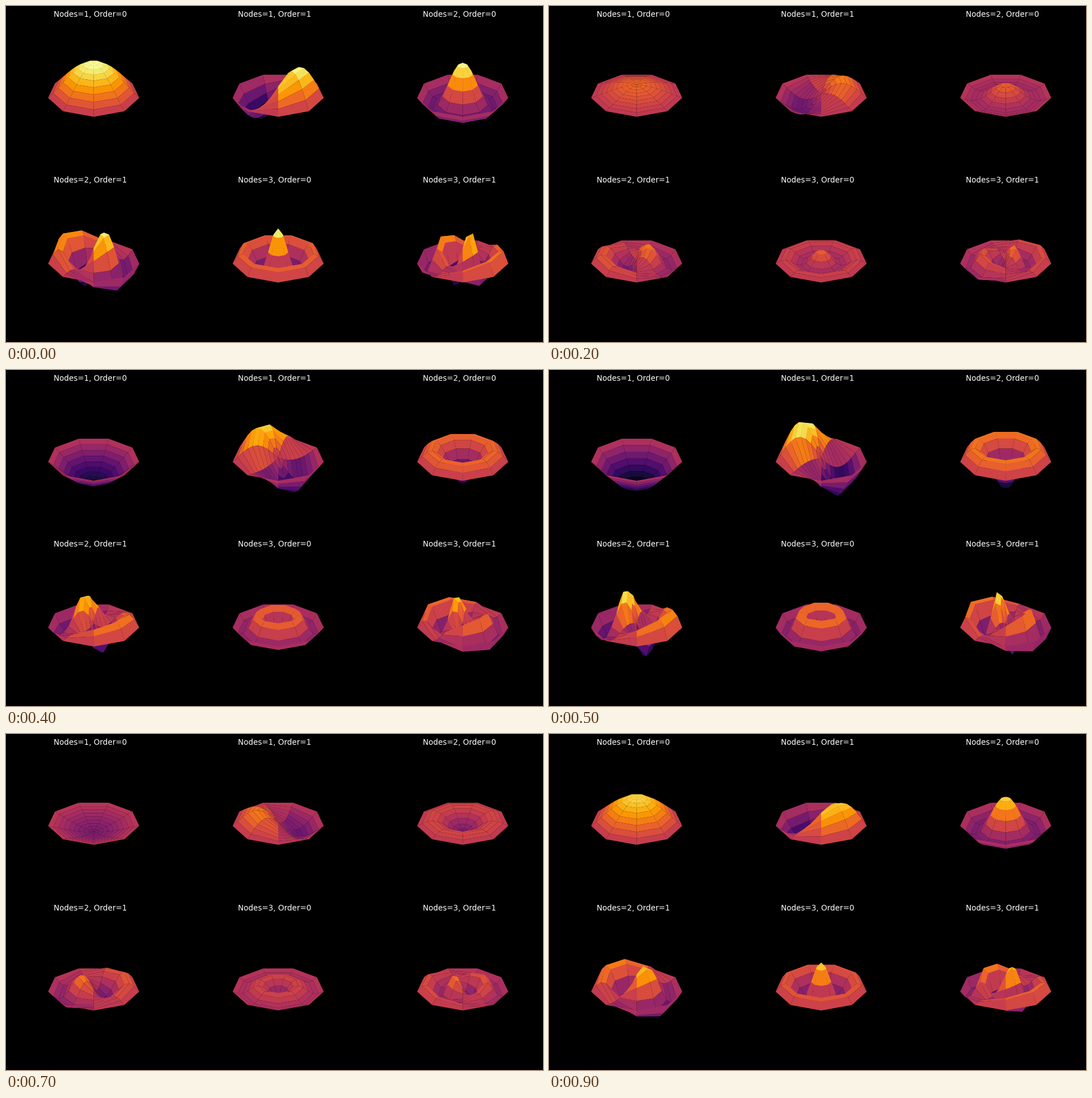
A matplotlib script that plays this animation: 947 px wide and 592 px high, repeating every 1 s.

```python
import numpy as np
import matplotlib.pyplot as plt
from matplotlib.animation import FuncAnimation
from matplotlib.collections import PolyCollection

WIDTH, HEIGHT, DPI = 947, 592, 100
FRAMES, INTERVAL = 10, 100
COLUMN_STEP, ROW_STEP = 325.4, 292

# Camera: disc radius and height in pixels, foreshortening and perspective
RADIUS, TILT, LIFT = 80.9, 38.0, 54.0
DEPTH_FLOOR, DEPTH_HEIGHT = 0.0495, 0.02
CENTER_X, CENTER_Y = 154.6, 155.2

# Order-1 modes swing in a narrow ellipse about this axis
AXIS, MINOR = 1.0, 1 / 3

ZEROS = {(1, 0): 2.4048, (1, 1): 3.8317, (2, 0): 5.5201,
         (2, 1): 7.0156, (3, 0): 8.6537, (3, 1): 10.1735}
PEAK = {0: 1.0, 1: 0.5819}

radius, theta = np.meshgrid(np.linspace(0, 1, 10),
                            np.linspace(0, 2 * np.pi, 10), indexing="ij")


def bessel(order, x):
    tau = (np.arange(200) + 0.5) * np.pi / 200
    return np.cos(order * tau - x[..., None] * np.sin(tau)).mean(axis=-1)


def quads(grid):
    corners = grid[:-1, :-1], grid[1:, :-1], grid[1:, 1:], grid[:-1, 1:]
    return np.stack([c.ravel() for c in corners], axis=1)


def swing(order, t):
    if order == 0:
        return np.cos(t)
    angle = theta - AXIS
    return np.cos(t) * np.cos(angle) + MINOR * np.sin(t) * np.sin(angle)


def project(z, x0, y0):
    toward, right = radius * np.cos(theta), radius * np.sin(theta)
    near = 1 / (1 - DEPTH_FLOOR * toward - DEPTH_HEIGHT * z)
    x = x0 + RADIUS * right * near
    y = y0 + (TILT * toward - LIFT * z) * near
    return x, y, near


fig = plt.figure(figsize=(WIDTH / DPI, HEIGHT / DPI), dpi=DPI, facecolor="black")
ax = fig.add_axes([0, 0, 1, 1])
ax.set_xlim(0, WIDTH)
ax.set_ylim(HEIGHT, 0)
ax.axis("off")

drums = []
for index, ((nodes, order), zero) in enumerate(ZEROS.items()):
    row, column = divmod(index, 3)
    dx, dy = column * COLUMN_STEP, row * ROW_STEP
    surface = PolyCollection([], cmap="inferno", edgecolors="none",
                             linewidths=0, antialiaseds=True)
    surface.set_clim(-1, 1)
    ax.add_collection(surface, autolim=False)
    ax.text(148.6 + dx, 18.8 + dy, f"Nodes={nodes}, Order={order}",
            color="white", family="DejaVu Sans", size=9.75,
            ha="center", va="baseline")
    shape = bessel(order, zero * radius) / PEAK[order]
    drums.append((surface, order, shape, CENTER_X + dx, CENTER_Y + dy))


def update(frame):
    t = 2 * np.pi * frame / FRAMES
    for surface, order, shape, x0, y0 in drums:
        z = shape * swing(order, t)
        x, y, near = (quads(g) for g in project(z, x0, y0))
        back_to_front = np.argsort(near.mean(axis=1), kind="stable")
        surface.set_verts(np.stack([x, y], axis=-1)[back_to_front])
        surface.set_array(quads(z).mean(axis=1)[back_to_front])
    return [drum[0] for drum in drums]


anim = FuncAnimation(fig, update, frames=FRAMES, interval=INTERVAL,
                     repeat=True, repeat_delay=0)
plt.show()
```
